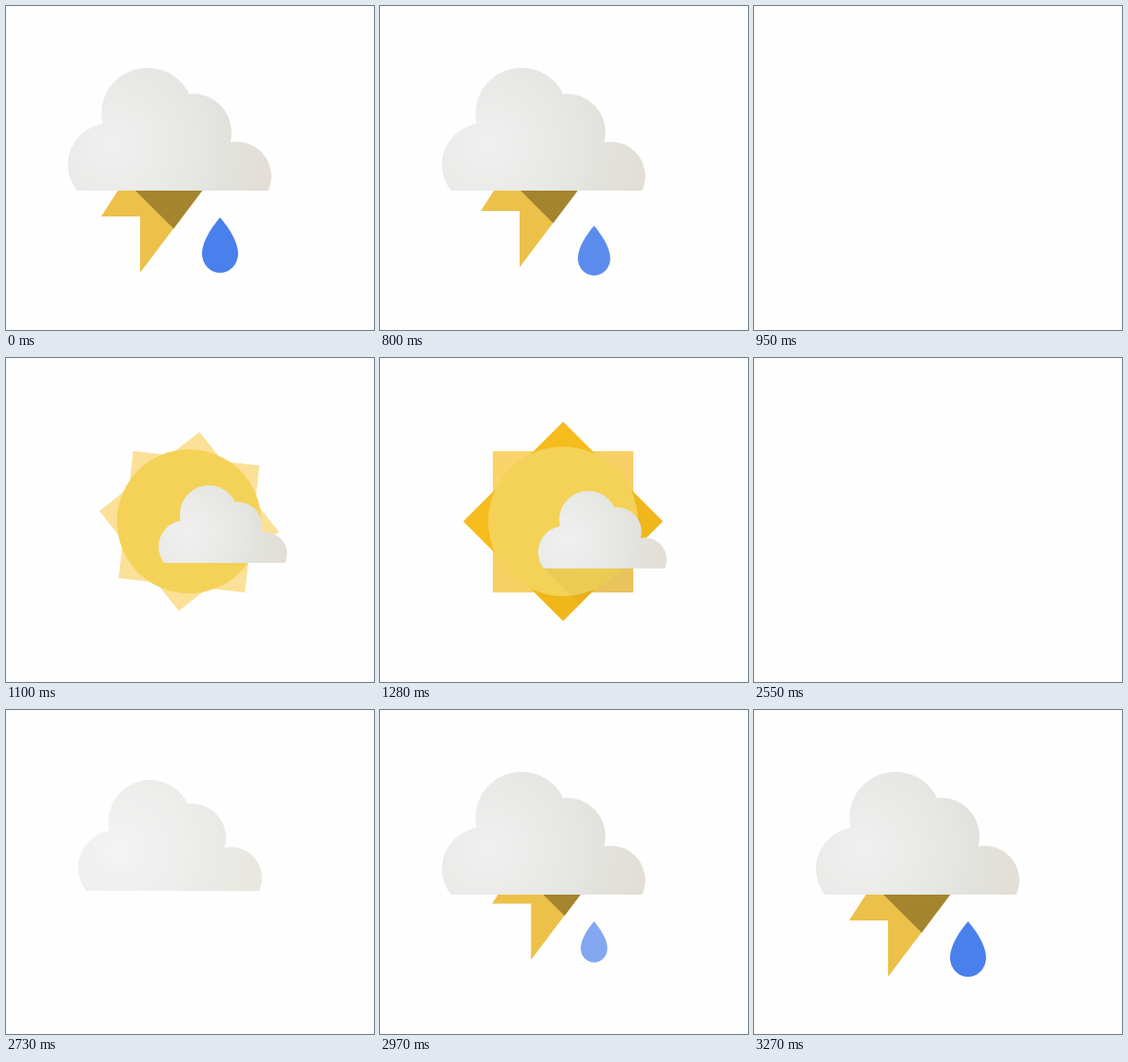
An HTML page for the animation above (3.3 s loop, 398 by 351 pixels).

```html
<!DOCTYPE html>
<html lang="en">
<head>
<meta charset="utf-8">
<title>Weather icons</title>
<style>
  html, body { margin: 0; width: 100%; height: 100%; overflow: hidden; background: #fefefe; }
  svg { display: block; width: 398px; height: 351px; }
</style>
</head>
<body>
<svg viewBox="0 0 398 351">
  <defs>
    <radialGradient id="mist" gradientUnits="userSpaceOnUse" cx="116" cy="150" r="172">
      <stop offset="0" stop-color="#f0f0f0"/>
      <stop offset=".45" stop-color="#e8e8e6"/>
      <stop offset=".72" stop-color="#e2e2dd"/>
      <stop offset="1" stop-color="#e3ded6"/>
    </radialGradient>
    <clipPath id="above"><rect width="398" height="200"/></clipPath>
    <clipPath id="below"><rect y="200" width="398" height="151"/></clipPath>
    <clipPath id="sunShape">
      <circle cx="198" cy="177" r="81"/>
      <rect x="122" y="101" width="152" height="153"/>
      <path d="M198 69L306 177L198 285L90 177Z"/>
    </clipPath>
    <g id="cloud" clip-path="url(#above)" fill="url(#mist)">
      <circle cx="153" cy="116.7" r="49.8"/>
      <circle cx="202" cy="137" r="42"/>
      <circle cx="112" cy="172" r="45"/>
      <circle cx="249.5" cy="184.5" r="37.5"/>
      <path d="M112 130H200V160H250V200H112Z"/>
    </g>
  </defs>

  <g id="storm">
    <g clip-path="url(#below)">
      <g id="bolt">
        <path fill="#ecc14a" d="M198 80H302.5L145 289V228H103Z"/>
        <path fill="#a4842f" d="M128.4 188.4L198 80H302.5L181.3 241.3Z"/>
      </g>
    </g>
    <path id="drop" fill="#4a80ec" d="M231.5 229C240 239 251 255 251 268.5A19.5 20.5 0 0 1 212 268.5C212 255 223 239 231.5 229Z"/>
    <use id="bigCloud" href="#cloud"/>
  </g>

  <g id="sunny">
    <g id="rays">
      <rect x="122" y="101" width="152" height="153" fill="#fad46b"/>
      <path id="diamond" d="M198 69L306 177L198 285L90 177Z"/>
      <g id="shade">
        <path fill="#e0b035" d="M230 101H274V145ZM122 209V254H167Z"/>
        <path fill="#a67b0a" d="M274 209V254H229Z"/>
        <path fill="#c6940a" d="M252 123L306 177L198 285L144 231Z"/>
      </g>
    </g>
    <circle id="disc" cx="198" cy="177" r="81" fill="#f4d258"/>
    <g clip-path="url(#sunShape)">
      <path id="cast" d="M177 228H320V371Z"/>
    </g>
    <g id="smallCloud"><use href="#cloud" transform="translate(128.65 101.65) scale(.632)"/></g>
  </g>
</svg>
<script>
  const LOOP = 3300, STEP = 30;
  const LEAVE = 800, SUN = 950, RETURN = 2550;
  const $ = id => document.getElementById(id);
  const part = {};
  for (const id of ['storm', 'bolt', 'drop', 'bigCloud', 'sunny', 'rays', 'diamond',
                    'shade', 'disc', 'cast', 'smallCloud']) part[id] = $(id);

  const ramp = (t, a, b) => Math.min(1, Math.max(0, (t - a) / (b - a)));
  const easeOut = (t, a, b) => 1 - (1 - ramp(t, a, b)) ** 3;
  const mix = (a, b, p) => a + (b - a) * p;
  const mixColor = (a, b, p) => `rgb(${a.map((v, i) => Math.round(mix(v, b[i], p)))})`;
  const move = (id, value) => part[id].setAttribute('transform', value);
  const fade = (id, value) => part[id].setAttribute('opacity', value);
  const zoom = (x, y, s) => `translate(${x} ${y}) scale(${s}) translate(${-x} ${-y})`;

  function placeStorm(lift, dropY, dropScale, dropAlpha, cloudScale, cloudAlpha, alpha) {
    move('bolt', `translate(${lift} ${-lift})`);
    move('drop', `translate(0 ${dropY}) ${zoom(231.5, 259, dropScale)}`);
    fade('drop', dropAlpha);
    move('bigCloud', zoom(181.5, 159, cloudScale));
    fade('bigCloud', cloudAlpha);
    fade('storm', alpha);
  }

  function leaveStorm(t) {
    const n = t < LEAVE ? 0 : (t - LEAVE) / STEP + 1;
    placeStorm(6 * n, 6 * n, 1 - n / 10, 1 - n / 10, 1, 1, 1 - ramp(n, 3, 6));
  }

  function enterStorm(t) {
    const grow = easeOut(t, RETURN, 3000);
    const strike = easeOut(t, 2760, 3270);
    const fall = easeOut(t, 2800, 3270);
    placeStorm(90 * (1 - strike), -30 * (1 - fall), fall, ramp(t, 2800, 3050),
               mix(.555, 1, grow), ramp(t, RETURN, 2800), 1);
  }

  function placeSun(t) {
    const p = easeOut(t, SUN, 1310), rest = 1 - p;
    move('rays', `translate(198 177.2) rotate(${33 * rest}) scale(${1 - .48 * rest}) translate(-198 -177.2)`);
    fade('rays', ramp(t, SUN, 1165));
    part.diamond.setAttribute('fill', mixColor([250, 212, 107], [245, 183, 15], ramp(t, 1100, 1310)));
    move('disc', zoom(198, 177, 1 - .185 * rest));
    fade('disc', ramp(t, SUN, 1070));
    move('smallCloud', `translate(${-30 * rest} ${-30 * rest})`);
    fade('smallCloud', ramp(t, SUN, 1070));
    fade('shade', ramp(t, 1250, 1550));
    fade('cast', .31 * ramp(t, 1250, 1550));
  }

  function draw(time) {
    let t = time % LOOP;
    const base = t < RETURN ? LEAVE : RETURN;
    if (t >= LEAVE) t = base + Math.floor((t - base) / STEP + 1e-6) * STEP;
    const sun = t >= SUN && t < RETURN;
    part.sunny.setAttribute('display', sun ? 'inline' : 'none');
    part.storm.setAttribute('display', sun ? 'none' : 'inline');
    if (sun) placeSun(t);
    else if (t < SUN) leaveStorm(t);
    else enterStorm(t);
  }

  let start = null;
  function tick(now) {
    if (start === null) start = now;
    draw(now - start);
    requestAnimationFrame(tick);
  }
  draw(0);
  requestAnimationFrame(tick);
</script>
</body>
</html>
```
